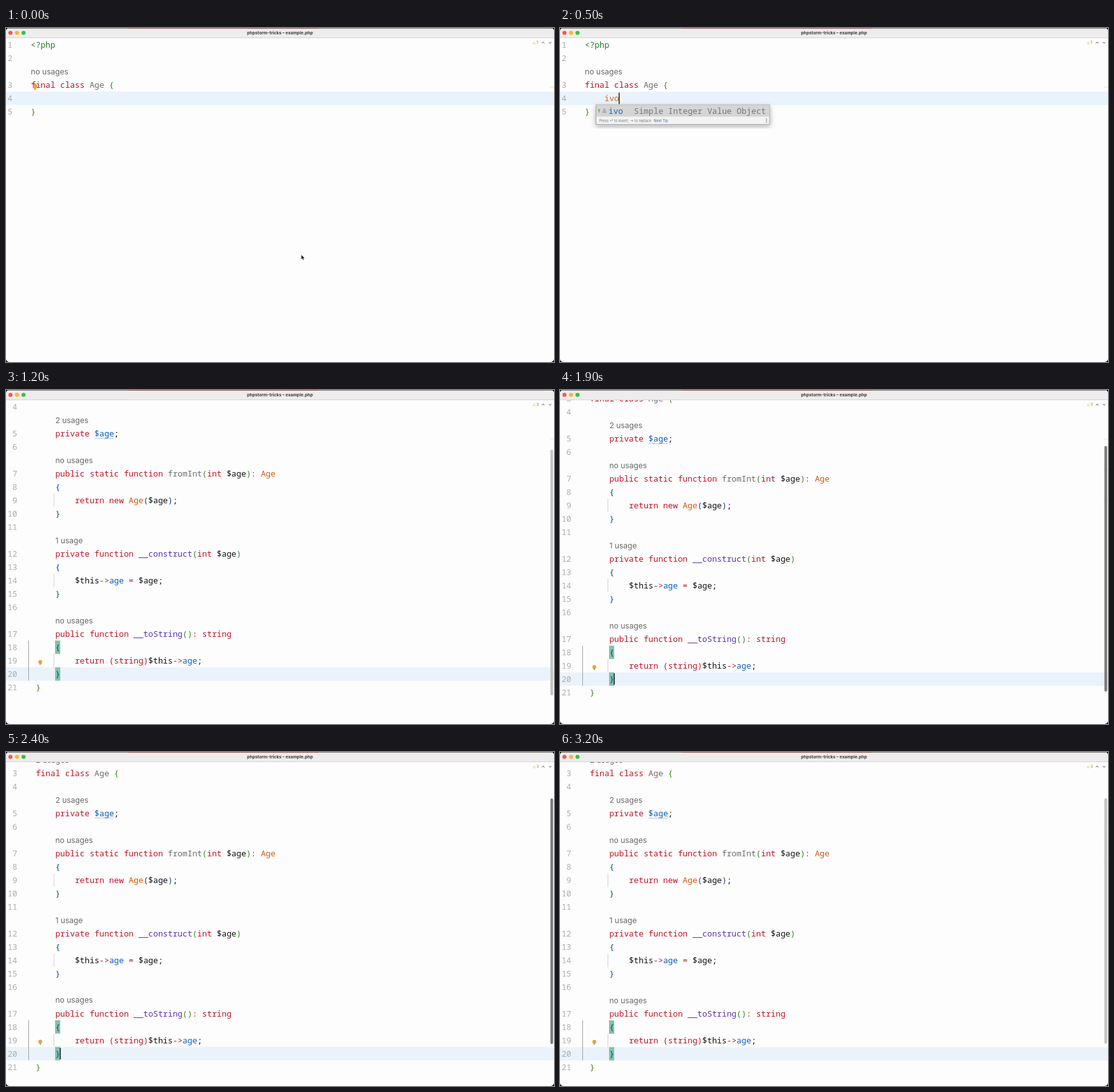
Write an HTML page that moves like this. It is 860 px wide and 525 px high and loops after 3300 ms.

```html
<!DOCTYPE html>
<html lang="en">
<head>
<meta charset="utf-8">
<title>Value object template</title>
<style>
  html, body { margin: 0; width: 100%; height: 100%; overflow: hidden; background: #000; }
  svg { display: block; width: 860px; height: 525px; }
  text { white-space: pre; }
  .code { font: 12.8px "Noto Sans Mono", "DejaVu Sans Mono", monospace; }
  .ui { font-family: Inter, "Open Sans", "DejaVu Sans", sans-serif; }
  .bold { font-weight: 700; }
</style>
</head>
<body>
<svg id="stage" viewBox="0 0 860 525" xmlns="http://www.w3.org/2000/svg">
  <defs>
    <clipPath id="window"><rect width="860" height="525" rx="5"/></clipPath>
    <clipPath id="editor"><rect y="16" width="860" height="509"/></clipPath>
    <filter id="shadow" x="-10%" y="-10%" width="120%" height="130%">
      <feDropShadow dx="0" dy="3" stdDeviation="4" flood-opacity=".3"/>
    </filter>
  </defs>
  <g clip-path="url(#window)">
    <rect width="860" height="525" fill="#fdfdfd"/>
    <g id="view" clip-path="url(#editor)"></g>
    <rect width="860" height="15" fill="#eeecec"/>
    <rect y="15" width="860" height="1" fill="#d6d5d5"/>
    <rect width="860" height=".7" fill="#4a4545"/>
    <rect x="192" width="298" height=".7" fill="#8b4a3c"/>
    <circle cx="7" cy="7.6" r="3.2" fill="#f4574f"/>
    <circle cx="17.3" cy="7.6" r="3.2" fill="#f5b731"/>
    <circle cx="27.5" cy="7.6" r="3.2" fill="#35bf45"/>
    <text class="ui bold" x="430" y="10" font-size="6.75" text-anchor="middle" fill="#3b3939">phpstorm-tricks – example.php</text>
  </g>
</svg>
<script>
const LOOP = 3300, STEP = 100;
const CHAR = 7.68, ROW = 20.98, TOP = 16.2;
const COLORS = {
  r: '#bd1428', g: '#6b6b6b', G: '#348a12', B: '#0b4585', b: '#0a5cb8',
  k: '#111', o: '#d2570f', p: '#5a32a8', t: '#217a26', m: '#1b66bd'
};

// Each line is "number~column~tokens"; a token's first letter picks its colour. No number: usage hint.
const EMPTY_CLASS = ['1~0~t<?php', '2', '~0~no usages', '3~0~rfinal class |gAge |G{', '4', '5~0~G}'];
const FULL_CLASS = [
  '~0~2 usages', '3~0~rfinal class |gAge |G{', '4',
  '~4~2 usages', '5~4~rprivate |b$age|k;', '6',
  '~4~no usages', '7~4~rpublic static function |gfromInt|G(|rint |k$age|G)|r: |oAge',
  '8~4~B{', '9~8~rreturn new |oAge|B(|k$age|B)|k;', '10~4~B}', '11',
  '~4~1 usage', '12~4~rprivate function |p__construct|G(|rint |k$age|G)',
  '13~4~B{', '14~8~k$this|r->|bage |r= |k$age;', '15~4~B}', '16',
  '~4~no usages', '17~4~rpublic function |p__toString|G()|r: string',
  '18~4~B{', '19~8~rreturn (string)|k$this|r->|bage|k;', '20~4~B}', '21~0~G}'
];

const SUGGESTIONS = [
  ['id', 'Symfony #[ORM\\Id]', ''],
  ['ivo', 'Simple Integer Value Object', 'up'],
  ['ignore', 'Symfony #[Ignore]', 'down'],
  ['index', 'Symfony #[ORM\\Index(...)]', 'down'],
  ['private'], ['static'], ['final'], ['function'], ['public']
];

const esc = s => s.replace(/&/g, '&amp;').replace(/</g, '&lt;').replace(/>/g, '&gt;');
const rect = (x, y, w, h, fill, more = '') =>
  `<rect x="${x}" y="${y}" width="${w}" height="${h}" fill="${fill}" ${more}/>`;
const path = (d, stroke, width = 1, fill = 'none') =>
  `<path d="${d}" stroke="${stroke}" stroke-width="${width}" fill="${fill}"/>`;
const text = (x, y, body, fill, cls = 'code', more = '') =>
  `<text class="${cls}" x="${x}" y="${y}" fill="${fill}" ${more}>${body}</text>`;
const span = (body, fill) => `<tspan fill="${fill}">${esc(body)}</tspan>`;
const rowTop = row => TOP + row * ROW;
const baseline = row => rowTop(row) + 15;

function codeLines(lines, firstRow, left) {
  return lines.map((line, i) => {
    const [number, column = 0, body = ''] = line.split('~');
    const x = left + column * CHAR, y = baseline(firstRow + i);
    if (!number) return text(x, y - .2, body, '#686868', 'ui', 'font-size="12.1"');
    const tokens = body.split('|').map(t => span(t.slice(1), COLORS[t[0]])).join('');
    return text(left - 28.9, y, number, '#adadad', 'code', 'text-anchor="end"') +
      (body ? text(x, y, tokens, '#111') : '');
  }).join('');
}

const caret = (x, row) => rect(x - .6, rowTop(row) + 1.5, 1.3, ROW - 3, '#000');

const bulb = (x, y, size) => `<g transform="translate(${x} ${y}) scale(${size})">
  <circle r="3.1" fill="#e9a13b"/>${rect(-1.5, 2.4, 3, 1.6, '#e9a13b')}${rect(-1.3, 4.1, 2.6, .8, '#8a8a8a')}</g>`;

function inspections(count) {
  return path('M829 20.2L832 25.4H826Z', 'none', 0, '#f3eb9b') +
    text(832.6, 25.1, count, '#777', 'ui', 'font-size="5.8"') +
    path('M841 24.2L843 21.9L845 24.2M851.8 21.9L853.8 24.2L855.8 21.9', '#555', .9);
}

function highlightMatch(word, typed) {
  const at = word.indexOf(typed);
  return esc(word.slice(0, at)) + span(typed, COLORS.m) + esc(word.slice(at + typed.length));
}

function templateIcon(y, arrow) {
  const head = arrow === 'up' ? -1 : 1;
  const color = arrow === 'up' ? '#4d9b45' : '#d84c58';
  return path(`M66.5 ${y + 2.5}H73M66.8 ${y + .5}H72.7M69.7 ${y - 2.5}V${y}M68 ${y - 2.6}H71.5`, '#84919c', 1) +
    (arrow ? path(`M61.3 ${y - 2.5}V${y + 2.5}M59.6 ${y + head * .8}L61.3 ${y + head * 2.5}L63 ${y + head * .8}`, color, 1) : '');
}

function popup(typed) {
  const rows = SUGGESTIONS.filter(([word]) => word.includes(typed));
  const pitch = 18.43, height = rows.length * pitch + 12.2;
  const items = rows.map(([word, hint, arrow], i) => {
    const y = 130.3 + i * pitch;
    return text(76, y + 4.6, highlightMatch(word, typed), '#000', hint ? 'code' : 'code bold') +
      (hint ? text(323.3, y + 4.6, esc(hint), '#777', 'code', 'text-anchor="end"') + templateIcon(y, arrow) : '');
  }).join('');
  const foot = 121 + height - 4;
  return rect(56.5, 121, 272.5, height, '#f3f3f3', 'stroke="#a2a2a2" filter="url(#shadow)"') +
    rect(57, 121.5, 271.5, 17.8, '#d5d5d5') + items +
    text(61.5, foot, 'Press ⏎ to insert, ⇥ to replace', '#777', 'ui', 'font-size="5.6"') +
    text(147.3, foot, 'Next Tip', '#2a6ab5', 'ui', 'font-size="5.6"') +
    [-2.4, 0, 2.4].map(d => `<circle cx="324" cy="${foot - 2 + d}" r=".75" fill="#555"/>`).join('');
}

const pointer = path('M463.3 356.3V364L465.1 362.4L466.3 365L467.6 364.4L466.5 361.9H468.8Z', '#fff', .6, '#000');

function typingScene(t) {
  const typed = t < 300 ? '' : 'ivo'.slice(0, t / 100 - 2);
  const left = 39, x = left + 4 * CHAR;
  return rect(0, rowTop(4), 860, ROW, '#eaf3fb') +
    codeLines(EMPTY_CLASS, 0, left) +
    rect(853, 92.5, 7, 1, '#f2ea96') + inspections(1) +
    (t < 100 ? bulb(45.6, 91.5, 1.1) : caret(x + typed.length * CHAR, 4)) +
    (typed ? text(x, baseline(4), typed, '#e0640f') + popup(typed) : pointer);
}

const scrollOffset = t => t <= 1800 ? 0 : 28 * (1 - Math.exp(-.337 * ((t - 1800) / 100) ** 1.47));
const fade = (t, start) => Math.min(1, Math.max(0, (t - start) / 200));

function scrollbar(t, offset) {
  const idle = t < 1800 ? fade(t, 1000) : fade(t, 2800);
  const shade = Math.round(120 + 73 * idle);
  return rect(854.4, 94 - .76 * offset, 4.2, 386, `rgb(${shade},${shade},${shade})`, 'rx="2"');
}

function classScene(t) {
  const left = 46.7, x = left + 4 * CHAR, offset = scrollOffset(t);
  const analysed = t >= 900;
  const guide = row => rect(74.7, rowTop(row), 1, ROW, '#d2d2d2');
  const brace = row => rect(x - .4, rowTop(row), CHAR + .4, ROW, '#83c3a8');
  let wave = `M${x + 8 * CHAR} ${rowTop(2) + 18.4}`;
  for (let i = 0; i < 15; i++) wave += `l2 ${i % 2 ? 1.3 : -1.3}`;
  const caretOn = Math.floor((t + 950) / 700) % 2 === 0;

  return `<g transform="translate(0 ${offset.toFixed(2)})">` +
    rect(0, rowTop(20), 860, ROW, '#eaf3fb') +
    [7, 13, 19].map(guide).join('') + [18, 20].map(brace).join('') +
    rect(35, rowTop(18), 1, 3 * ROW, '#a3a3a3') +
    path(wave, '#94abc2', .8) +
    codeLines(FULL_CLASS, -2, left) +
    (analysed ? bulb(53.8, 427.4, .95) : '') +
    (caretOn ? caret(x + CHAR, 20) : '') + '</g>' +
    rect(853.5, 76.5, 6.5, 1, '#e5e3d8') +
    (analysed ? rect(853.5, 125, 6.5, 1, '#e5e3d8') + rect(853.5, 173, 6.5, 1, '#e5e3d8') : '') +
    scrollbar(t, offset) + inspections(analysed ? 3 : 1);
}

const view = document.getElementById('view');
const start = performance.now();
let shown = -1;

function draw() {
  const t = Math.floor(((performance.now() - start) % LOOP) / STEP) * STEP;
  if (t !== shown) {
    view.innerHTML = t < 600 ? typingScene(t) : classScene(t);
    shown = t;
  }
  requestAnimationFrame(draw);
}
draw();
</script>
</body>
</html>
```
